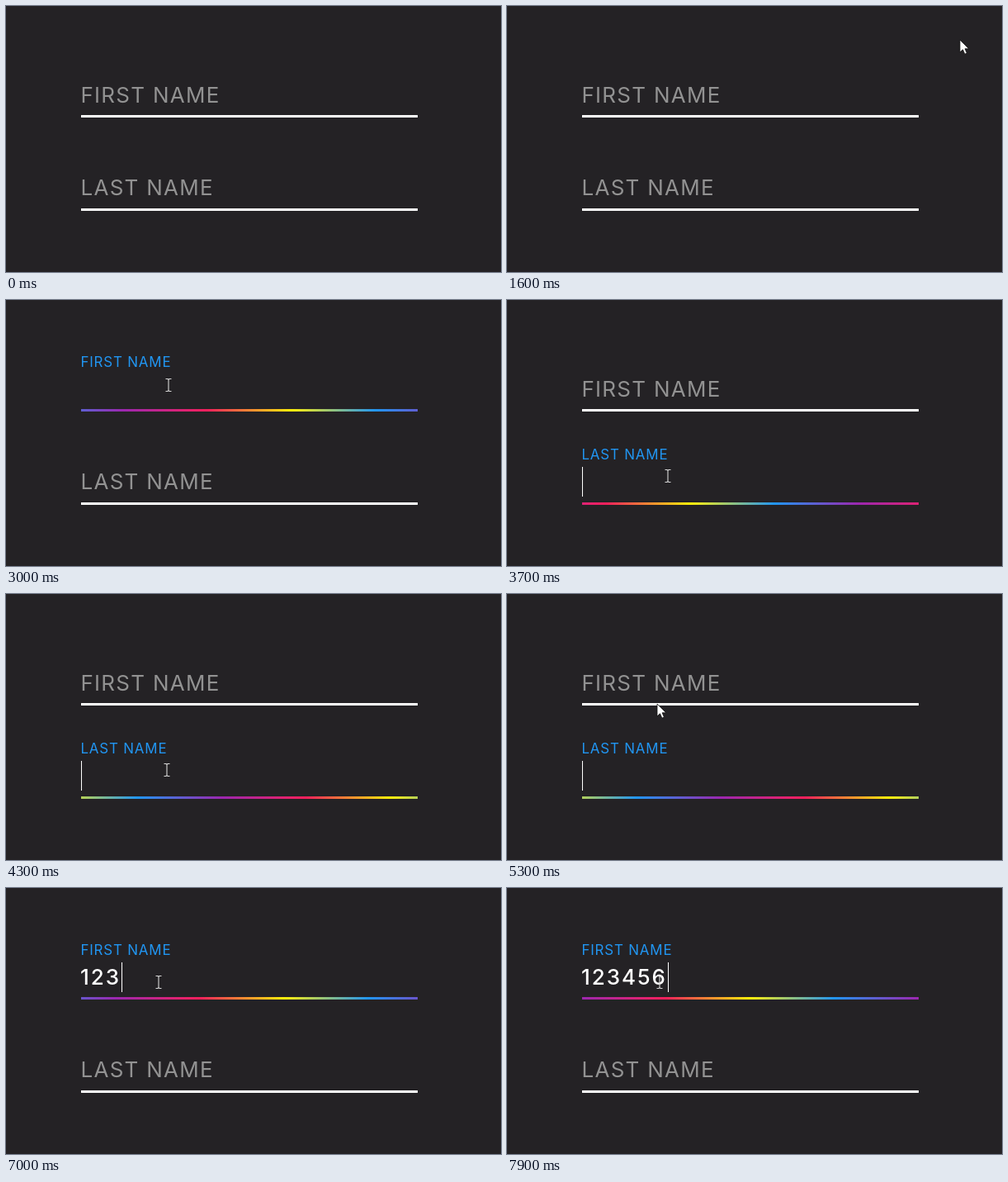
Animation, 600 px wide and 322 px high, one loop 8000 ms. Source, as an HTML page:

```html
<!DOCTYPE html>
<html lang="en">
<head>
<meta charset="utf-8">
<title>Floating label inputs</title>
<style>
  html, body { margin: 0; width: 100%; height: 100%; overflow: hidden; background: #242225; }
  svg { display: block; width: 600px; height: 322px; }
  text { font: 400 26px Inter, Lato, sans-serif; letter-spacing: .05em; }
  .value { font-weight: 500; letter-spacing: .075em; }
</style>
</head>
<body>
<svg id="stage" viewBox="0 0 600 322">
  <defs>
    <linearGradient id="rainbow" gradientUnits="userSpaceOnUse" x1="91" x2="499" spreadMethod="repeat">
      <stop offset="0" stop-color="#2196f3"/>
      <stop offset=".25" stop-color="#9c27b0"/>
      <stop offset=".5" stop-color="#f7205c"/>
      <stop offset=".75" stop-color="#ffee0a"/>
      <stop offset="1" stop-color="#2196f3"/>
    </linearGradient>
  </defs>
</svg>
<script>
const LOOP = 8000, STEP = 100, LEFT = 91, WIDTH = 408, MOVE = 300, BLINK = 500;
const stage = document.getElementById('stage');
const rainbow = document.getElementById('rainbow');

function add(tag, attrs, parent = stage) {
  const el = document.createElementNS('http://www.w3.org/2000/svg', tag);
  set(el, attrs);
  parent.appendChild(el);
  return el;
}
function set(el, attrs) {
  for (const k in attrs) el.setAttribute(k, attrs[k]);
}
const show = (el, on) => set(el, { visibility: on ? 'visible' : 'hidden' });
const mix = (a, b, p) => a + (b - a) * p;
const smooth = x => x * x * (3 - 2 * x);
const ramp = (t, from) => smooth(Math.min(1, Math.max(0, (t - from) / MOVE)));

function makeField(name, y, lineY, spans) {
  const g = add('g', { transform: `translate(0 ${y})` });
  const line = add('rect', { x: LEFT, y: lineY - y, width: WIDTH, height: 3 }, g);
  const label = add('text', {}, g);
  label.textContent = name;
  const value = add('text', { class: 'value', x: LEFT - 1, y: 117, fill: '#fff' }, g);
  const caret = add('rect', { y: 90, width: 1, height: 36, fill: '#fff' }, g);
  return { line, label, value, caret, spans };
}

// each span is [focus, blur]
const fields = [
  makeField('FIRST NAME', 0, 132, [[2450, 3260], [5500, Infinity]]),
  makeField('LAST NAME', 112, 245, [[3260, 5500]])
];

const typing = { text: '123456', start: 6600, gap: 200 };

const arrow = add('path', {
  d: 'M0 0V15L3.5 11.8 5.9 17.2 8.4 16.1 6.1 10.8H10.8Z',
  fill: '#fff', stroke: '#111', 'stroke-width': .8
});
const beam = add('path', {
  d: 'M-3.5 -7.5H-1L0 -6.5 1 -7.5H3.5M0 -6.5V6.5M-3.5 7.5H-1L0 6.5 1 7.5H3.5',
  fill: 'none', stroke: '#d8d8d8', 'stroke-width': 1.1
});

// time, x, y
const path = [
  [1600, 549, 41], [2300, 194, 110], [2450, 194, 110], [2900, 197, 102.5],
  [3000, 197, 102.5], [3250, 195, 213], [5130, 195, 213], [5300, 182, 133], [5500, 185, 114]
];

function pointer(t) {
  const i = path.findIndex(p => p[0] > t);
  if (i < 0) return path[path.length - 1].slice(1);
  const a = path[i - 1], b = path[i];
  const p = smooth((t - a[0]) / (b[0] - a[0]));
  return [mix(a[1], b[1], p), mix(a[2], b[2], p)];
}

function drawField(f, t, chars) {
  const span = f.spans.find(s => t >= s[0] && t < s[1]);
  const up = f.spans.reduce((sum, [on, off]) => sum + ramp(t, on) - ramp(t, off), 0);
  const color = [[146, 33], [146, 150], [146, 243]].map(c => Math.round(mix(...c, up)));
  set(f.label, {
    transform: `translate(90.4 ${mix(117, 81, up)}) scale(${mix(1, .65, up)})`,
    fill: `rgb(${color})`
  });
  set(f.line, { fill: span ? 'url(#rainbow)' : '#fff' });

  const text = typing.text.slice(0, chars);
  if (f.value.textContent !== text) f.value.textContent = text;
  const width = chars ? f.value.getComputedTextLength() : 0;
  set(f.caret, { x: Math.round(LEFT + width) });
  const since = chars ? typing.start + (chars - 1) * typing.gap : span && span[0];
  show(f.caret, span && (t - since) % (2 * BLINK) < BLINK);
}

function draw(t) {
  const phase = .875 + .9945 * (t - 3000) / 1000;
  set(rainbow, { gradientTransform: `translate(${(phase - Math.floor(phase)) * WIDTH} 0)` });

  const typed = Math.floor((t - typing.start) / typing.gap) + 1;
  const chars = Math.max(0, Math.min(typing.text.length, typed));
  drawField(fields[0], t, chars);
  drawField(fields[1], t, 0);

  const visible = t >= path[0][0];
  const [x, y] = visible ? pointer(t) : [0, 0];
  const inside = x > LEFT && x < LEFT + WIDTH && (y > 88 && y < 132 || y > 200 && y < 244);
  show(arrow, visible && !inside);
  show(beam, visible && inside);
  const at = `translate(${Math.round(x)} ${Math.round(y)})`;
  set(arrow, { transform: at });
  set(beam, { transform: at });
}

function tick() {
  draw(Math.floor((performance.now() + 5) % LOOP / STEP) * STEP);
  requestAnimationFrame(tick);
}
tick();
</script>
</body>
</html>
```
